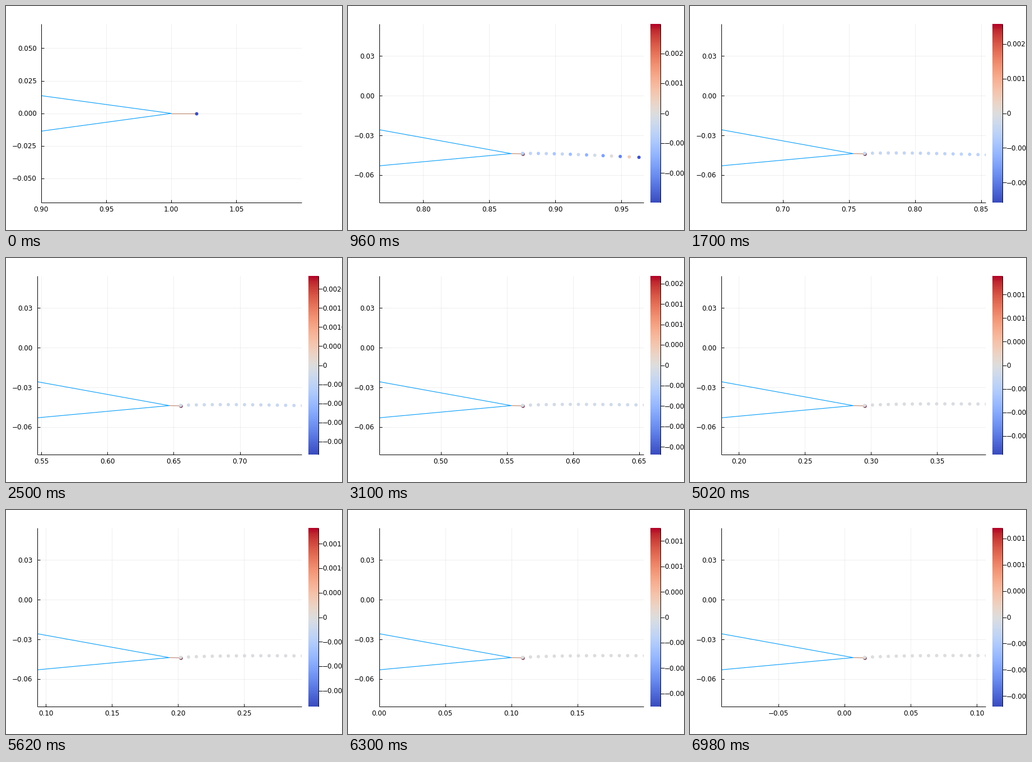
Write a matplotlib script that moves like this. It is 600 by 400 pixels and loops after 7080 ms.

```python
import numpy as np
import matplotlib.pyplot as plt
from matplotlib.animation import FuncAnimation
from matplotlib.patches import Rectangle

W, H, DPI = 600, 400, 100
PX = 72 / DPI
TOP, BOTTOM, RIGHT = 32, 351, 527.7
BAR_L, BAR_R = 540, 557.5
MID = (TOP + BOTTOM) / 2
STEPS, TICK_MS, LOOP_MS = 150, 20, 7080
BLUE, BROWN, PLUM = "#009afa", "#b8806a", "#7a4456"

plt.rcParams["font.family"] = "DejaVu Sans"
fig = plt.figure(figsize=(W / DPI, H / DPI), dpi=DPI, facecolor="white")
ax = fig.add_axes([0, 0, 1, 1])
ax.set_axis_off()
live = []


def line(xs, ys, color="black", width=1.0, z=2, **kw):
    art, = ax.plot(xs, ys, color=color, lw=width * PX, zorder=z,
                   solid_capstyle="butt", **kw)
    live.append(art)
    return art


def label(x, y, value, digits, ha):
    text = f"{value:.{digits}f}".replace("-", "\u2212")
    live.append(ax.text(x, y + 4.4, text, size=12 * PX, ha=ha, va="baseline"))


def dots(x, y, colors, z, size=6):
    art = ax.scatter(x, y, s=(size * PX) ** 2, c=colors, linewidths=0, zorder=z)
    live.append(art)
    return art


def limit(n):
    """Half range of the colour scale, shrinking as the wake grows."""
    u = np.log(n / 53)
    return 0.00234 * np.exp(-0.2789 * u - 0.02925 * u * u)


def strength(j):
    """Circulation of vortex j, with the start-up oscillation."""
    mean = -0.35 * np.exp(-(j - 6) / 30)
    flip = 0.75 * np.exp(-(j - 5) / 5) * np.where(j % 2, 1, -1)
    return limit(20) * (mean + flip)


def wake(n, tail):
    """Positions of the visible vortices, newest first."""
    age = np.arange(min(n, 18) + 1)
    j = n - age
    stretch = np.minimum(5.3 * np.exp(-(j - 6) / 2.2), 12) * (age / 14) ** 2
    x = tail + 20.2 + 14 * age + 0.033 * age ** 2 + stretch
    y = 263.2 - 5.87 * (1 - np.exp(-age / 6)) + 320 / (n + 6) * age / 14
    first = j == 0
    x = np.where(first, tail + 44.6 + 15.73 * age, x)
    y = np.where(first, 160.3, y)
    return x, y, j


def draw_axes(n, left, scale, zero, dy, ks, digits):
    line([left, left], [TOP, BOTTOM], z=6)
    line([left, RIGHT], [BOTTOM, BOTTOM], z=6)
    lo = 0.9 - n / STEPS
    for k in range(int(np.ceil(lo / 0.05 - 1e-6)), 40):
        x = left + (k * 0.05 - lo) * scale
        if x > RIGHT - 0.1:
            break
        line([x, x], [TOP, BOTTOM], width=0.9, z=1, alpha=0.07)
        line([x, x], [BOTTOM, BOTTOM - 5], z=6)
        label(x, 362.5, k * 0.05, 2, "center")
    for k in ks:
        y = zero - k * dy * scale
        line([left, RIGHT], [y, y], width=0.9, z=1, alpha=0.07)
        line([left, left + 5], [y, y], z=6)
        label(left - 8, y, k * dy, digits, "right")


def draw_bar(n):
    ramp = np.linspace(1, 0, 256)[:, None]
    live.append(ax.imshow(ramp, cmap="coolwarm", aspect="auto", zorder=3,
                          extent=(BAR_L, BAR_R, BOTTOM, TOP)))
    line([BAR_R, BAR_R], [TOP, BOTTOM], z=6)
    m = limit(n)
    dv, digits = (0.001, 3) if n < 50 else (0.0005, 4)
    top = int(m / dv)
    for k in range(-top, top + 1):
        y = MID - k * dv / m * (BOTTOM - TOP) / 2
        line([BAR_R, BAR_R + 7], [y, y], z=6)
        label(BAR_R + 7.5, y, k * dv, digits if k else 0, "left")


def draw_scene(n):
    while live:
        live.pop().remove()
    cmap = plt.get_cmap("coolwarm")
    left = 55.5 if n else 62.7
    scale = (RIGHT - left) / 0.2
    tail = (left + RIGHT) / 2
    if n:
        draw_axes(n, left, scale, 160.3, 0.03, range(-2, 2), 2)
        draw_bar(n)
        tail_y, up, down = 263.6, 220.9, 285.4
        x, y, j = wake(n, tail)
        parts = [
            line([tail, x[0]], [tail_y, 264], BROWN, 1.1),
            dots([x[0]], [263.7], [PLUM], 4, 6.5),
            dots(x, y, cmap(0.5 + strength(j) / limit(n) / 2), 5),
        ]
    else:
        draw_axes(n, left, scale, 191.7, 0.025, range(-2, 3), 3)
        tail_y, up, down = 191.8, 160.1, 223.5
        parts = [
            line([tail, tail + 44.6], [tail_y, tail_y], BROWN, 1.1),
            dots([tail + 44.6], [tail_y], [cmap(0.0)], 5),
        ]
    parts.append(line([left, tail, left], [up, tail_y, down], BLUE, 1.1, 3))
    frame = Rectangle((left, TOP), RIGHT - left, BOTTOM - TOP,
                      transform=ax.transData)
    for art in parts:
        art.set_clip_path(frame)
    ax.set(xlim=(0, W), ylim=(H, 0))


def step_at(ms):
    """Steps last 20, 100 and 20 ms in turn."""
    block, rest = divmod(ms, 140)
    return min(3 * block + (rest >= 20) + (rest >= 120), STEPS - 1)


shown = None


def update(tick):
    global shown
    n = step_at(tick * TICK_MS)
    if n != shown:
        draw_scene(n)
        shown = n
    return live


anim = FuncAnimation(fig, update, frames=LOOP_MS // TICK_MS,
                     interval=TICK_MS, repeat=True, blit=False)
plt.show()
```
